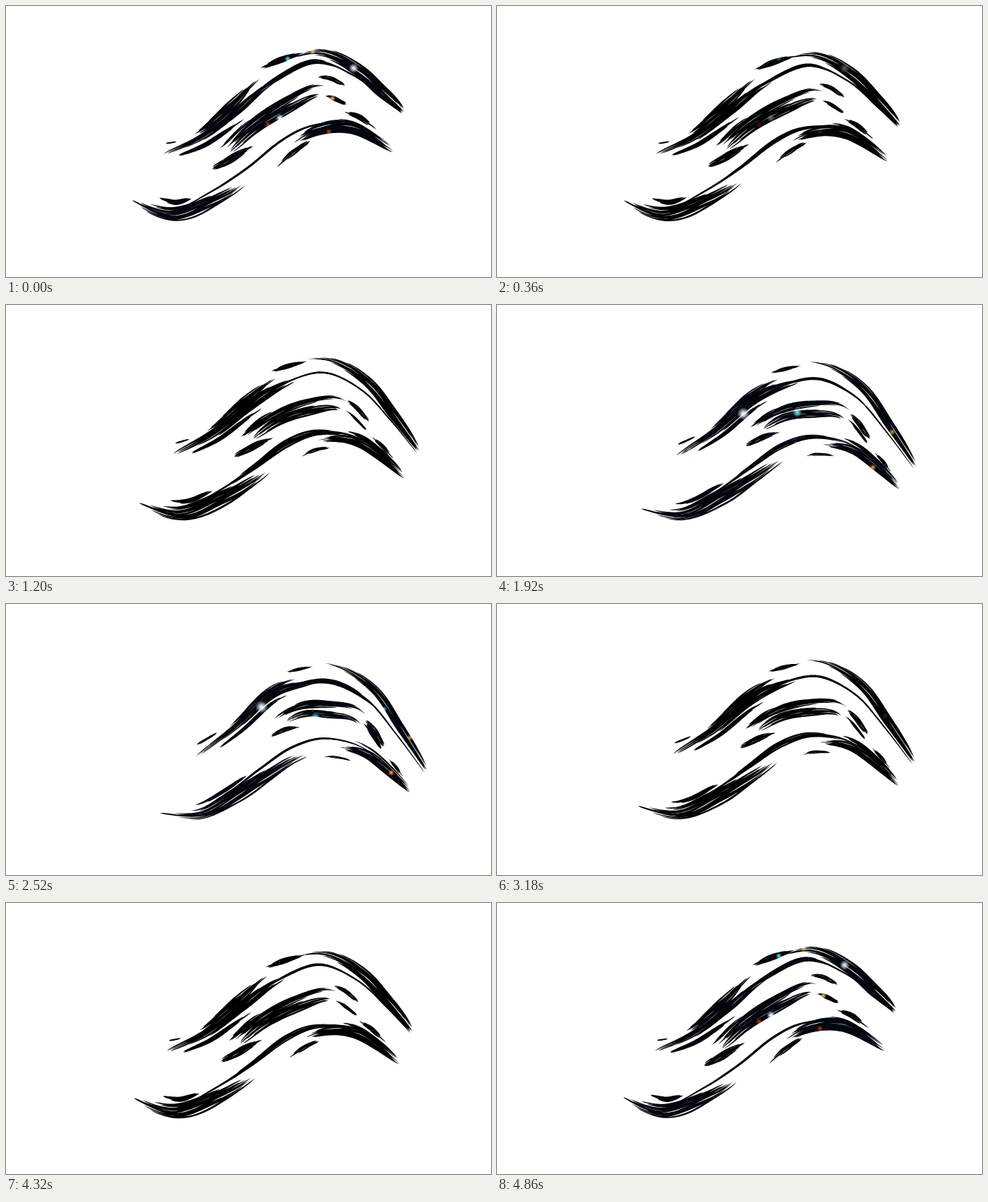
Recreate the animation shown at these times as an HTML page with a canvas. Size 685 by 384 pixels, loop 4.92 s.

```html
<!DOCTYPE html>
<html lang="en">
<head>
<meta charset="utf-8">
<title>Ink wave</title>
<style>
  html, body { margin: 0; width: 100%; height: 100%; overflow: hidden; background: #fff; }
  canvas { display: block; }
</style>
</head>
<body>
<canvas id="stage" width="685" height="384"></canvas>
<script>
const ctx = document.getElementById('stage').getContext('2d');
const LOOP = 4920, STEP = 60, SAMPLES = 26;

const clamp = (v, lo = 0, hi = 1) => Math.min(hi, Math.max(lo, v));
const mix = (a, b, u) => a + (b - a) * u;

let seed = 4127;
const rnd = () => (seed = (seed * 16807) % 2147483647) / 2147483647;

// The swell runs leftward: the right side leads, the left side lags (side 0..1).
const ripple = (tau, side) => mix(tau ** 2, 1 - (1 - tau) ** 1.7, side);

// A wave is a spine of "x,y" knots that travels between two poses.
function wave(rest, crest) {
  const parse = s => s.split(' ').map(k => k.split(',').map(Number));
  return { rest: parse(rest), crest: parse(crest), streaks: [] };
}

// place: [start, end, offset at start, offset at end, width], along the spine
// drift: how far each of these moves by mid-loop; swell: extra width halfway
function streak(wave, place, drift = [0, 0, 0, 0, 0], swell = 0) {
  const widest = place[4] + Math.max(0, drift[4], swell + drift[4] / 2);
  const count = Math.ceil(widest / 2.6);
  const bristles = Array.from({ length: count }, (_, i) => {
    const lane = (i + 0.5) / count - 0.5;
    const trim = count > 1 ? 0.05 + Math.abs(lane) * 0.6 : 0;
    return { lane, from: rnd() * trim, to: 1 - rnd() * trim, size: 1.05 + rnd() * 0.5, phase: rnd() * 6 };
  });
  wave.streaks.push({ place, drift, swell, count, bristles });
}

const top3 = wave(
  '222,211 275,187 325,150 370,111 435,79 490,98 530,128 560,153',
  '270,218 325,175 375,130 415,114 460,111 510,136 550,183 592,240');
streak(top3, [0, 0.5, 0, 0, 11], [0, 0.06, 0, 0, 0], 4);
streak(top3, [0.05, 0.3, 9, 15, 6], [0.02, 0.07, 0, -5, -1]);
streak(top3, [0.12, 0.42, -9, -14, 12], [0, 0, 3, 5, -5]);
streak(top3, [0.43, 0.55, -25, -15, 8], [-0.05, -0.05, 4, -6, -4]);
streak(top3, [0.35, 1, 0, 0, 2]);
streak(top3, [0.38, 0.66, 0, 0, 7], [0, 0.1, 0, 0, 0], -5);
streak(top3, [0.5, 1, -15, -3, 18], [0.03, 0, -11, -1, -6]);
streak(top3, [0.03, 0.07, -14, -10, 2], [0, 0.03, 0, 0, 1]);

const middle = wave(
  '290,230 315,203 350,170 400,137 445,118 482,137',
  '376,185 392,165 420,151 455,150 500,160 533,205');
streak(middle, [0.18, 0.85, -4, -5, 11], [0, 0, -3, -3, 0], -2);
streak(middle, [0.18, 0.8, 4, 8, 13], [0.05, 0.05, 0, 0, -3], 2);
streak(middle, [0.78, 0.92, -17, -18, 6], [0.05, 0.08, 15, 16, 3], -2);
streak(middle, [0.84, 1, 8, 2, 6], [0, 0, -5, 0, -1], -2);
streak(middle, [0, 0.32, 1, 21, 11], [0, 0, 0, 0, -4]);
streak(middle, [0.15, 0.48, -10, -9, 4], [0, 0, 0, 0, -2], 4);

const bottom = wave(
  '179,272 235,288 290,263 340,230 390,190 435,169 490,168 550,207',
  '219,294 275,292 320,264 360,233 405,203 455,191 515,210 573,267');
streak(bottom, [0, 0.4, 3, 16, 20], [0, 0.24, 0, 2, 0], 3);
streak(bottom, [0.09, 0.22, -13, -6, 7], [0.04, 0.16, 5, 2, -2]);
streak(bottom, [0.15, 0.86, 0, 0, 2.5]);
streak(bottom, [0.3, 0.86, 0, 0, 2], [0, 0, 0, 0, 0], 8);
streak(bottom, [0.6, 1, 12, 0, 17], [0.16, 0, -2, 0, -5], -2);
streak(bottom, [0.5, 0.68, 26, 20, 7], [0.2, 0.14, 0, 4, -4]);
streak(bottom, [0.82, 0.92, -15, -10, 7], [0.08, 0.03, 6, 4, -3]);
streak(bottom, [0.8, 0.98, -4, -3, 2], [0, 0, 0, 0, 0], 4);

// Glints seen inside the ink; phase 0 glows at the loop ends, phase 1 mid-loop.
const stars = [];
const star = (phase, color, x, y, r = 4.5) => stars.push({ phase, color, x, y, r });
star(0, '#4fd0d8', 398, 75);
star(0, '#b59a30', 433, 65);
star(0, '#d5dbe8', 491, 88, 7);
star(0, '#ff9a3c', 461, 131);
star(0, '#dff2ff', 387, 159, 6);
star(0, '#b02a18', 370, 168);
star(0, '#ff4a22', 305, 216);
star(0, '#a83220', 456, 178);
star(0, '#6e1c10', 186, 271, 6);
star(0, '#e0552a', 548, 206);
star(1, '#e2e8f2', 348, 154, 9);
star(1, '#55d5e6', 424, 152, 7);
star(1, '#3f9fb0', 521, 140);
star(1, '#2b6c8c', 272, 206);
star(1, '#b09030', 558, 180);
star(1, '#ff7a30', 531, 230);
star(1, '#4aa6c0', 423, 197);

function spline(a, b, c, d, u) {
  return b + 0.5 * u * (c - a + u * (2 * a - 5 * b + 4 * c - d + u * (3 * (b - c) + d - a)));
}

function pointAt(knots, u) {
  const last = knots.length - 1, i = clamp(Math.floor(u * last), 0, last - 1);
  return [0, 1].map(c => spline(knots[Math.max(0, i - 1)][c], knots[i][c],
    knots[i + 1][c], knots[Math.min(last, i + 2)][c], u * last - i));
}

// Point beside the spine; positive offsets lie below it.
function beside(knots, u, off) {
  const [x, y] = pointAt(knots, u);
  const a = pointAt(knots, u - 0.01), b = pointAt(knots, u + 0.01);
  const dx = b[0] - a[0], dy = b[1] - a[1], len = Math.hypot(dx, dy) || 1;
  return [x - dy / len * off, y + dx / len * off];
}

const taper = v => Math.sqrt(Math.max(0, Math.sin(Math.PI * clamp(v))));

function paintStreak(knots, { place, drift, swell, count, bristles }, tau) {
  const p = ripple(tau, (place[0] + place[1]) / 2);
  const [u0, u1, off0, off1, base] = place.map((v, i) => v + drift[i] * p);
  const width = base + swell * Math.sin(Math.PI * tau);
  ctx.beginPath();
  for (const { lane, from, to, size, phase } of bristles) {
    const upper = [], lower = [];
    for (let i = 0; i <= SAMPLES; i++) {
      const v = mix(from, to, i / SAMPLES), u = mix(u0, u1, v);
      const sway = 0.05 * Math.sin(v * 11 + phase);
      const off = mix(off0, off1, v) + (lane + sway) * width * taper(v);
      const half = width / count * size * 0.5 * taper(i / SAMPLES);
      upper.push(beside(knots, u, off - half));
      lower.unshift(beside(knots, u, off + half));
    }
    [...upper, ...lower].forEach(([x, y], i) => i ? ctx.lineTo(x, y) : ctx.moveTo(x, y));
    ctx.closePath();
  }
  ctx.fill();
}

function paintWave({ rest, crest, streaks }, tau) {
  const knots = rest.map(([x, y], i) => {
    const p = ripple(tau, clamp((x - 180) / 400));
    return [mix(x, crest[i][0], p), mix(y, crest[i][1], p)];
  });
  streaks.forEach(s => paintStreak(knots, s, tau));
}

function paintGlow(t, tau) {
  const glow = [clamp(1.1 - tau * 5), clamp((t - 1150) / 600) * clamp((3300 - t) / 500)];
  ctx.globalCompositeOperation = 'source-atop';
  ctx.globalAlpha = Math.max(...glow);
  ctx.fillStyle = '#03070d';
  ctx.fillRect(0, 0, 685, 384);
  for (const s of stars) {
    const k = s.phase * (t - 1920) / 600;
    const x = s.x + 13 * k, y = s.y + (s.x < 420 ? -8 : 9) * k;
    const g = ctx.createRadialGradient(x, y, 0, x, y, s.r);
    g.addColorStop(0.2, s.color);
    g.addColorStop(1, s.color + '00');
    ctx.globalAlpha = glow[s.phase];
    ctx.fillStyle = g;
    ctx.fillRect(x - s.r, y - s.r, s.r * 2, s.r * 2);
  }
  ctx.globalAlpha = 1;
  ctx.globalCompositeOperation = 'source-over';
}

function draw(t) {
  const tau = 1 - Math.abs(2 * t / LOOP - 1);
  ctx.clearRect(0, 0, 685, 384);
  ctx.fillStyle = '#000';
  [top3, middle, bottom].forEach(w => paintWave(w, tau));
  paintGlow(t, tau);
}

const start = performance.now();
function tick() {
  const t = (performance.now() - start) % LOOP;
  draw(Math.floor(t / STEP) * STEP);
  requestAnimationFrame(tick);
}
tick();
</script>
</body>
</html>
```
